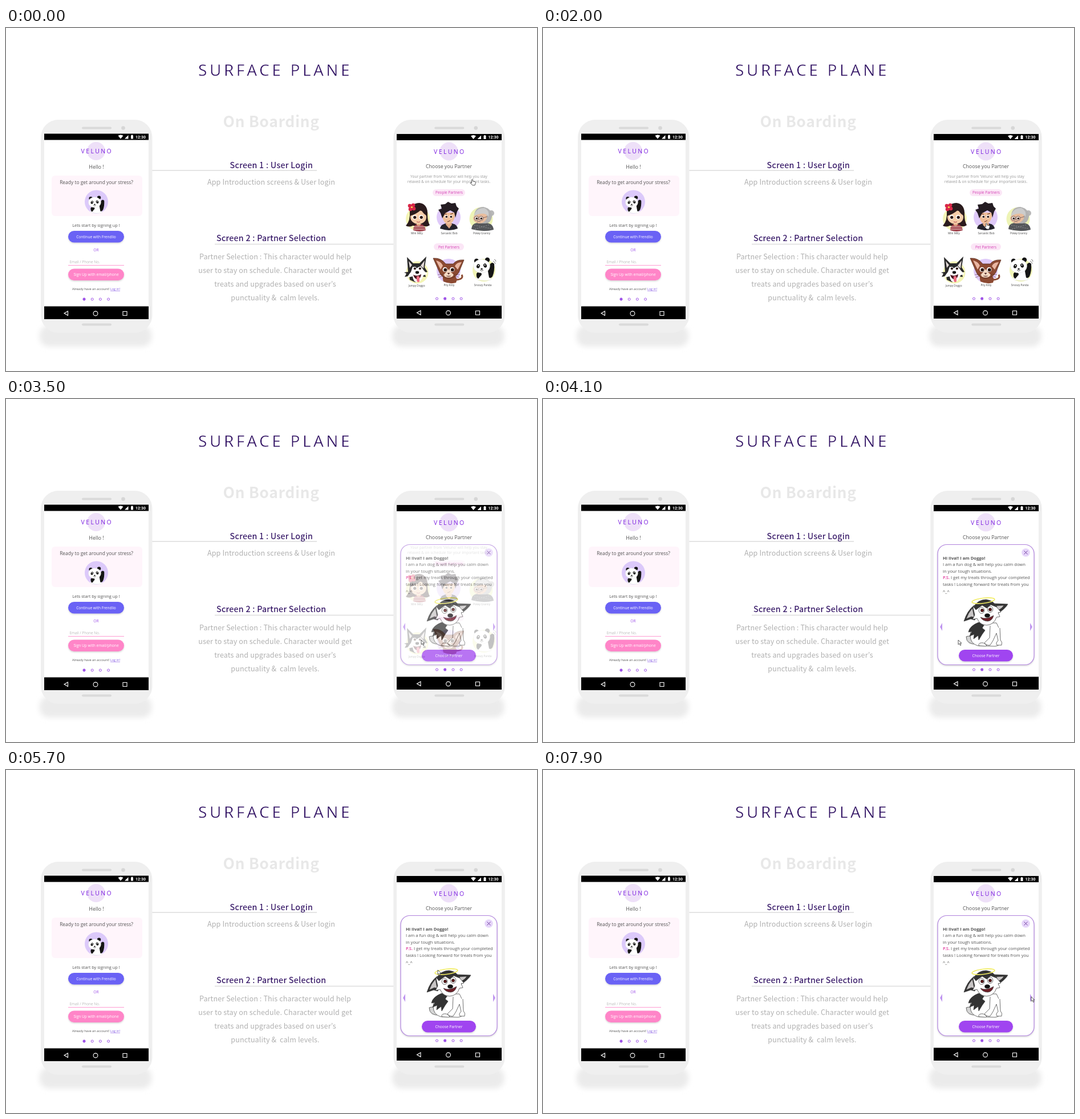
An HTML page that plays this animation: 931 px wide and 602 px high, repeating every 8000 ms.

```html
<!DOCTYPE html>
<html lang="en">
<head>
<meta charset="utf-8">
<title>Surface plane</title>
<style>
html, body { margin: 0; width: 100%; height: 100%; overflow: hidden; background: #fff; }
svg { display: block; width: 931px; height: 602px; }
text { font-family: "Open Sans", "Noto Sans", sans-serif; fill: #555; white-space: pre; }
.mid { text-anchor: middle; }
.cjk { font-family: "Noto Sans CJK JP", "Noto Sans CJK SC", "Noto Sans CJK", sans-serif; }
.title { font-size: 28px; letter-spacing: 4.6px; fill: #2a0a5e; stroke: #fff; stroke-width: .45; }
.head { font-size: 14.3px; letter-spacing: .36px; fill: #2a0a5e; stroke: #2a0a5e; stroke-width: .15; }
.body { font-size: 12.5px; letter-spacing: .14px; fill: #b0b0b0; }
.brand { font-size: 10.5px; letter-spacing: 2.4px; fill: #7b1fe0; }
.sub { font-size: 6.55px; fill: #999; }
.tag { font-size: 6.45px; fill: #d43fb4; }
.name { font-size: 4.7px; fill: #444; }
.btn { font-size: 6.6px; fill: #fff; }
.note { font-size: 7.6px; }
</style>
</head>
<body>
<svg viewBox="0 0 931 602">
<defs>
  <filter id="blur" x="-20%" y="-60%" width="140%" height="220%"><feGaussianBlur stdDeviation="5"/></filter>
  <filter id="drop" x="-20%" y="-20%" width="140%" height="160%"><feDropShadow dx="0" dy="1.5" stdDeviation="1.2" flood-color="#555" flood-opacity=".25"/></filter>

  <g id="phone">
    <rect x="59" y="522" width="196" height="37" rx="16" fill="#ebebeb" filter="url(#blur)"/>
    <rect x="61" y="161" width="195.500" height="374" rx="31" fill="#efefef"/>
    <rect x="133" y="173.500" width="52" height="4" rx="2" fill="#dadada"/>
    <circle cx="205.500" cy="175.500" r="3.300" fill="#d6d6d6"/>
    <rect x="133" y="518.500" width="52" height="4" rx="2" fill="#dadada"/>
  </g>
  <g id="status" fill="#fff">
    <path d="M196.500 189q4.500-3 9 0l-4.500 5.500zM208 194.500h6.500V188zM219 188.500h1v-1h2v1h1v6h-4z"/>
    <text x="227" y="193.500" font-size="7" font-weight="700" style="font-family:Roboto,sans-serif;fill:#fff">12:30</text>
  </g>
  <g id="nav" fill="none" stroke="#fff" stroke-width="1.100">
    <path d="M108.500 497v7.500l-6.500-3.750zM205 497.500h7v7h-7z"/>
    <circle cx="157" cy="501" r="3.900"/>
  </g>
  <g id="logo">
    <circle cx="158" cy="216" r="16" fill="#eee0f8"/>
    <text class="brand" x="131.500" y="220">VELUNO</text>
  </g>

  <g id="panda">
    <path d="M-13 17q-1-13 5-15H8q6 6 4 16-12 3-25-1z" fill="#fff" stroke="#ccc" stroke-width=".4"/>
    <path d="M-13 7q3-4 8-3l1 5-6 7q-4-2-3-9zM9 14L7 3l4-13q4-4 7 0 1 12-3 22-3 4-6 2z" fill="#151515"/>
    <circle cx="-13" cy="-15" r="4.200" fill="#151515"/><circle cx="6" cy="-17" r="4.200" fill="#151515"/>
    <ellipse cx="-4" cy="-6" rx="14.500" ry="12" fill="#fff" stroke="#ccc" stroke-width=".4"/>
    <ellipse cx="-10" cy="-6" rx="2.800" ry="3.700" fill="#151515" transform="rotate(25 -10 -6)"/>
    <ellipse cx="2" cy="-7" rx="2.800" ry="3.700" fill="#151515" transform="rotate(-25 2 -7)"/>
    <g fill="#fff"><circle cx="-9.500" cy="-7" r="1.100"/><circle cx="1.500" cy="-8" r="1.100"/></g>
    <ellipse cx="-4" cy="-1" rx="1.800" ry="1.200" fill="#151515"/>
    <path d="M-7 1q3 3 6 0" fill="none" stroke="#151515" stroke-width=".7"/>
  </g>
  <g id="eyes">
    <circle cx="-5" r="3.400" fill="#fff"/><circle cx="5" r="3.400" fill="#fff"/>
    <circle cx="-4.600" cy=".3" r="2.300" fill="#2c1712"/><circle cx="5.400" cy=".3" r="2.300" fill="#2c1712"/>
  </g>
  <g id="dots" fill="#fff" stroke="#a055e8">
    <circle r="2"/><circle cx="14.200" r="2"/><circle cx="28.400" r="2"/><circle cx="42.600" r="2"/>
  </g>
</defs>

<text class="title" x="337" y="84">SURFACE PLANE</text>
<text class="cjk" x="380.500" y="174" font-size="26.500" font-weight="700" letter-spacing=".6" style="fill:#e8e8e8">On Boarding</text>
<path d="M256 250H545M366 379.500H680" stroke="#e4e4e4" stroke-width="2"/>
<text class="cjk head" x="392.600" y="246">Screen 1 : User Login</text>
<text class="cjk head" x="369" y="374">Screen 2 : Partner Selection</text>
<g class="mid">
  <text class="cjk body" x="465" y="275">App Introduction screens &amp; User login</text>
  <text class="cjk body" x="472" y="406">Partner Selection : This character would help</text>
  <text class="cjk body" x="472" y="430">user to stay on schedule. Character would get</text>
  <text class="cjk body" x="472" y="454">treats and upgrades based on user’s</text>
  <text class="cjk body" x="472" y="478">punctuality &amp;  calm levels.</text>
</g>

<!-- Login screen -->
<use href="#phone"/>
<rect x="67" y="185.500" width="183" height="325.500"/>
<rect x="67" y="196.500" width="183" height="292" fill="#fff"/>
<use href="#status"/><use href="#nav"/><use href="#logo"/>
<g class="mid">
  <text x="158.500" y="247" font-size="9">Hello !</text>
  <rect x="80" y="259" width="159" height="71" rx="6" fill="#fff5fb"/>
  <text x="158.500" y="273.500" font-size="8.450">Ready to get around your stress?</text>
  <circle cx="158.500" cy="305" r="20.500" fill="#dcc9fa"/>
  <use href="#panda" transform="translate(158.500 310.500) scale(.76)"/>
  <text x="158" y="349" font-size="7.450">Lets start by signing up !</text>
  <rect x="109" y="356" width="98" height="20.500" rx="10.250" fill="#6a62f5" filter="url(#drop)"/>
  <text class="btn" x="158" y="368.500">Continue with Frendlio</text>
  <text x="158" y="392" font-size="6.800" style="fill:#a055e8">OR</text>
  <text x="138" y="413" font-size="6.400" style="fill:#bbb">Email / Phone No.</text>
  <path d="M109 416.500h98" stroke="#ff9bd2"/>
  <rect x="109" y="422.500" width="98" height="20.500" rx="10.250" fill="#ff85c8" filter="url(#drop)"/>
  <text class="btn" x="158" y="435">Sign Up with email/phone</text>
  <text x="158" y="459.500" font-size="5.600">Already have an account! <tspan fill="#7b4fe0">Log in!</tspan></text>
  <path d="M183 461.500h17" stroke="#9a70e8" stroke-width=".7"/>
</g>
<use href="#dots" x="137" y="476"/><circle cx="137" cy="476" r="2.400" fill="#a055e8"/>

<!-- Partner screen -->
<use href="#phone" x="618.300"/>
<rect x="685" y="186" width="184" height="324"/>
<rect x="685" y="197" width="184" height="290.500" fill="#fff"/>
<use href="#status" x="618.500" y=".5"/><use href="#nav" x="618.500" y="-1"/><use href="#logo" x="618.500" y=".5"/>
<text class="mid" x="776.500" y="246" font-size="8.800">Choose you Partner</text>
<use href="#dots" x="755.500" y="475"/><circle cx="769.700" cy="475" r="2.400" fill="#a055e8"/>
<g class="mid">
  <text class="sub" x="776.500" y="262.500">Your partner from 'Veluno' will help you stay</text>
  <text class="sub" x="776.500" y="271.500">relaxed &amp; on schedule for your important tasks.</text>
  <rect x="748" y="283" width="57" height="12" rx="6" fill="#fbe6f6"/><text class="tag" x="777" y="291">People Partners</text>
  <rect x="750" y="378" width="53" height="12" rx="6" fill="#fbe6f6"/><text class="tag" x="776.500" y="386.500">Pet Partners</text>

  <g transform="translate(723 332)">
    <circle cx="-1" cy="3" r="21" fill="#f4f5b5"/>
    <path d="M-15-10Q-12-25 2-25 17-23 16-4q0 11 4 18-5 4-12 1h-18q-6 3-12 0 8-8 7-25z" fill="#2b1b1d"/>
    <path d="M-9 23q0-9 7-11h6q8 2 9 11-11 4-22 0z" fill="#a0414b"/>
    <path d="M-9 17h20M-9 21h22" stroke="#f1d9cf" stroke-width="1.200"/>
    <path d="M-3 9h7v5q-4 3-7 0z" fill="#e0a986"/>
    <ellipse cx="0" cy="0" rx="14" ry="12" fill="#f5cda9"/>
    <path d="M-15-2Q-12-19 1-19q15 1 15 17Q9-5 5-13-4-5-15-2z" fill="#2b1b1d"/>
    <use href="#eyes" transform="translate(-1 0) scale(1.150)"/><path d="M-3 8q3 2 6 0" fill="none" stroke="#b34848"/>
    <g fill="#d92848"><circle cx="-15" cy="-20" r="3.300"/><circle cx="-9" cy="-21" r="3.300"/><circle cx="-8" cy="-15" r="3.300"/><circle cx="-14" cy="-14" r="3.300"/></g>
    <circle cx="-11.500" cy="-17.500" r="1.600" fill="#ffd94e"/>
  </g>
  <text class="name" x="720.500" y="361.500">Mini Milly</text>

  <g transform="translate(776 332)">
    <circle y="2" r="21" fill="#dfcaf9"/>
    <path d="M-15 20Q-14 13-5 11H6q9 2 10 9-15 6-31 0z" fill="#25232d"/>
    <path d="M-4 8h8l2 5-5 7-6-7z" fill="#e2aa88"/>
    <path d="M-11-8H11Q12 4 5 10L0 13-7 9Q-12 2-11-8z" fill="#f0bf9a"/>
    <path d="M-11 2l-3-9-4-6 6-2-2-7 8-1 5-4 6 3 7-1 2 6 4 4-3 5-3 11-2-9-7-4-9 5z" fill="#241c22"/>
    <use href="#eyes" transform="translate(0 -1) scale(.8)"/><path d="M-2 8q3-1 5-2M-8-6l5 1M3-5l5-2" fill="none" stroke="#5d2a22"/>
  </g>
  <text class="name" x="777" y="361.500">Sarcastic Bob</text>

  <g transform="translate(834 334)">
    <circle cx="-1" cy="1" r="20.500" fill="#eef4b6"/>
    <path d="M-18 19Q-17 8-6 8H8q12 1 13 12-18 5-39-1z" fill="#55575a"/>
    <path d="M-13 12l29 6M-12 19l26-8" stroke="#8d9093" stroke-dasharray="2 2"/>
    <circle cx="17" cy="-9" r="5" fill="#b8b8b8"/>
    <path d="M-13-6Q-11-20 3-20q15 3 15 17Q16 9 7 9H-6z" fill="#b2b2b2"/>
    <path d="M-15-1Q-9-14 3-12q8 5 6 12-4 9-14 9-10-2-10-10z" fill="#e8bd9d"/>
    <path d="M-14-4Q-9-19 5-18q9 4 7 15Q5-13-14-4z" fill="#ccc"/>
    <use href="#eyes" transform="translate(-5 0) scale(.8)"/>
    <g fill="none" stroke="#66545a" stroke-width=".8"><circle cx="-9" r="3.800"/><circle cx="-1" r="3.800"/><path d="M3-1l7-2M-8 6q3-1 6 0"/></g>
  </g>
  <text class="name" x="834" y="361.500">Pokey Granny</text>

  <g transform="translate(720 425)">
    <circle cx="1" cy="4" r="19.500" fill="#f4f5b5"/>
    <path d="M-15 3l-2-26 11 11h11l12-12-3 19 5 8-5 1 2 8-7-1-4 7-8 3-9-4-1-7-8 2 3-6-4-2z" fill="#2a2a2a"/>
    <path d="M-14-16l6 7-4 5zM14-17L7-8l5 5z" fill="#e3dad8"/>
    <path d="M-10 3l3-9 6 3 8-4 6 8 6 6-7 2Q8 21 1 21T-7 11l-10 2 4-6z" fill="#fff"/>
    <use href="#eyes" transform="translate(1 -3) scale(.9)"/>
    <ellipse cx="1" cy="4" rx="3.200" ry="2.400" fill="#111"/>
    <path d="M-6 8q7 4 14-1-1 8-6 9-6 0-8-8z" fill="#4a1620"/><path d="M0 11q5-2 5 2v7q-4 3-5-2z" fill="#ed6f83"/>
  </g>
  <text class="name" x="720" y="453.500">Jumpy Doggo</text>

  <g transform="translate(776 425)">
    <circle cy="1" r="21" fill="#dfcaf9"/>
    <path d="M13 17q14-1 10-9" fill="none" stroke="#8c4a32" stroke-width="3"/>
    <path d="M-9 20q-3-9 2-12H9q8 6 4 14-10 3-22-2z" fill="#8c4a32"/>
    <path d="M-16 4l-11-25Q-13-22-5-11H8Q14-19 27-18L18 4Q12 14 0 14T-16 4z" fill="#8c4a32" stroke="#502619" stroke-width=".7"/>
    <path d="M-22-17q9 2 12 9l-4 7zM23-14q-9 0-12 7l5 6z" fill="#e9b6a2"/>
    <path d="M-9 8Q-4 4 0-2 4 4 9 8 7 13 0 13T-9 8z" fill="#f4d9c3"/>
    <use href="#eyes" transform="translate(0 -1) scale(1.250)"/>
    <path d="M-2 5h4l-2 2.500zM-4 10q4 2 8 0" fill="#4a2020" stroke="#4a2020" stroke-width=".5"/>
    <path d="M-7 7l-12 1M-7 9l-11 4M8 7l12 1M8 9l11 4" stroke="#502619" stroke-width=".5"/>
  </g>
  <text class="name" x="777" y="453">Pity Kitty</text>

  <circle cx="838" cy="425" r="20" fill="#f1f5b7"/>
  <use href="#panda" transform="translate(838 424)"/>
  <path d="M854 409q3 1 4 5m-2-8q3 1 3 4" fill="none" stroke="#444" stroke-width=".7"/>
  <text class="name" x="836" y="453">Snoozy Panda</text>
</g>

<!-- Partner card -->
<g id="card">
  <rect x="692" y="255.500" width="169" height="211" rx="16" fill="#fff" stroke="#b184de" stroke-width="1.200" filter="url(#drop)"/>
  <circle cx="846.500" cy="269.500" r="7.300" fill="#e6d5fa"/>
  <path d="M843.500 266.500l6 6m0-6l-6 6" stroke="#6d3a9c"/>
  <g class="note">
    <text x="701" y="281.500" font-weight="700">Hi Ilva!! I am Doggo!</text>
    <text x="701" y="293">I am a fun dog &amp; will help you calm down</text>
    <text x="701" y="304.500">in your tough situations.</text>
    <text x="701" y="316"><tspan fill="#e0389c" font-weight="600">P.S.</tspan> I get my treats through your completed</text>
    <text x="701" y="327.500">tasks ! Looking forward for treats from you</text>
    <text x="701" y="341">^_^</text>
  </g>
  <path d="M700 393v14l-4-7zM854 393v14l4-7z" fill="#bf95ef"/>
  <g stroke="#333" stroke-width=".7" stroke-linejoin="round">
    <path d="M762 430q-20 2-20-13 8-3 16 4z" fill="#d5d5d5"/>
    <path d="M763 393q-14 9-14 22 0 14 13 18l31 1q10-2 10-8l-5-5q6-13-3-28z" fill="#fff"/>
    <path d="M764 392q-16 6-18 17l6-1-4 8 8-3-1 8 8-6 1 8 6-10 5-7-5-4 5-8z" fill="#333"/>
    <path d="M784 398l-1 21-9 9q3 5 10 4l5-8 6-13 3 13q-5 4-2 8h8q2-5-2-9l-1-21" fill="#fff"/>
    <path d="M764 433q-1-6 8-5l6 4-2 2z" fill="#fff"/>
    <path d="M756 362q-12 9-18 28l12-4 7 2 4-13zM789 359l26 1q-5 9-19 17z" fill="#333"/>
    <path d="M753 367q-8 9-11 19l9-4 5 1zM795 363l13-1q-3 6-11 9z" fill="#c9c6c6"/>
    <path d="M754 366q7-13 23-13 15 2 19 13l7 8-5 1 3 7-6 1q-4 13-17 14-12 0-17-12l-8 2 4-8z" fill="#fff"/>
    <path d="M755 365q8-13 22-13 14 2 18 13l-10-4-7 6-8-5-11 8z" fill="#333"/>
    <ellipse cx="769" cy="371" rx="4.800" ry="5.500" fill="#fff"/><ellipse cx="784" cy="369" rx="4.800" ry="5.500" fill="#fff"/>
    <circle cx="770" cy="371" r="2.700" fill="#5b1718"/><circle cx="784" cy="369.500" r="2.700" fill="#5b1718"/>
    <path d="M767 383q10 5 23-3-2 9-10 10-9 0-13-7z" fill="#6e2028"/>
    <ellipse cx="779" cy="380" rx="4.500" ry="3.300" fill="#111"/>
  </g>
  <ellipse cx="772" cy="354" rx="20" ry="4.500" fill="none" stroke="#f2ed62" stroke-width="1.600" transform="rotate(-7 772 354)"/>
  <rect x="729" y="440" width="95" height="20.500" rx="10.250" fill="#a044f0" filter="url(#drop)"/>
  <text class="btn mid" x="776.500" y="452.500">Choose Partner</text>
</g>

<g id="cursor" fill="#fff" stroke="#333" stroke-width=".8" stroke-linejoin="round">
  <path id="hand" d="M-1.500 4V-2q1.200-1.500 2 0v3l4 .8q1.200.5.8 2L4 8H0L-4 4q0-1.500 2.500 0z"/>
  <path id="arrow" d="M0 0v8l2-1.800L3.500 9.500 5 8.800 3.500 5.600H6z"/>
</g>
</svg>
<script>
// time, x, y of the pointer
const path = [
  [0, 818, 268], [200, 818, 268], [900, 724, 340], [1100, 724, 340],
  [1600, 838, 340], [2000, 778, 345], [2800, 728, 423], [4600, 728, 423],
  [5500, 757, 351], [5800, 757, 351], [6400, 776, 447], [6500, 776, 447],
  [6900, 853, 400], [7500, 855, 399], [7900, 856, 398]
];
const get = id => document.getElementById(id);
const clamp = v => Math.max(0, Math.min(1, v));
const ease = v => v * v * (3 - 2 * v);

function draw(now) {
  const t = Math.floor(now % 8000 / 100) * 100;
  const i = Math.max(1, path.findIndex(p => p[0] >= t));
  const [t0, x0, y0] = path[i - 1], [t1, x1, y1] = path[i];
  const k = ease(clamp((t - t0) / (t1 - t0)));
  get("cursor").setAttribute("transform", `translate(${x0 + (x1 - x0) * k} ${y0 + (y1 - y0) * k})`);
  get("hand").style.display = t < 3200 ? "" : "none";
  get("arrow").style.display = t < 3200 ? "none" : "";
  get("card").style.opacity = clamp((t - 3100) / 540);
  requestAnimationFrame(draw);
}
requestAnimationFrame(draw);
</script>
</body>
</html>
```
